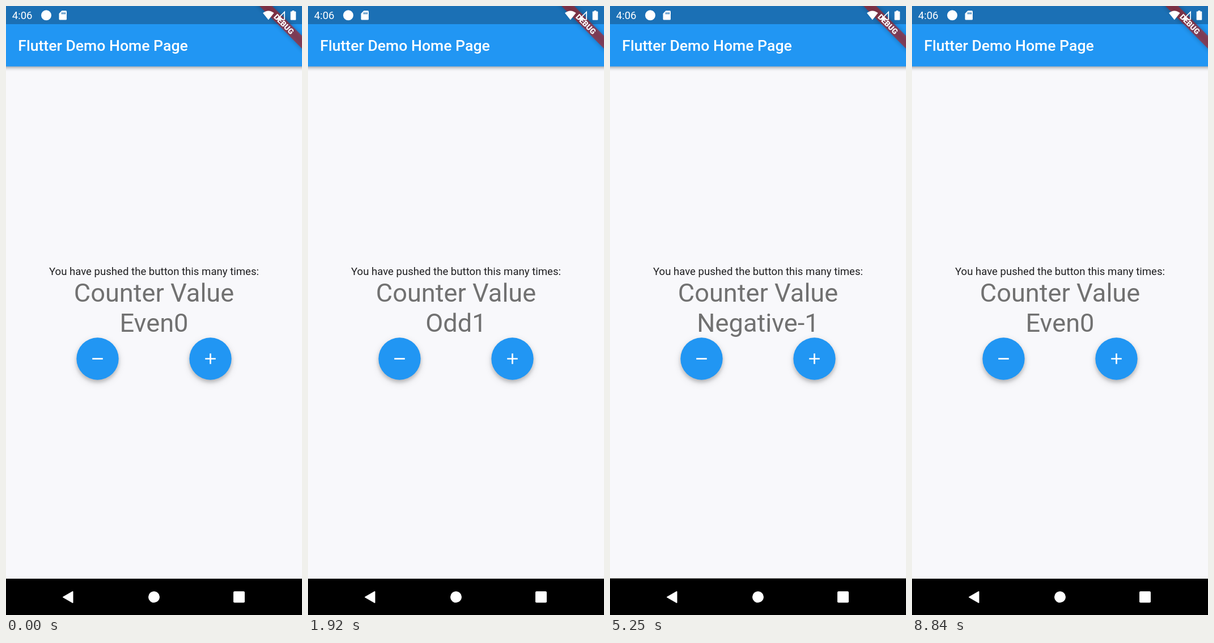
These frames come from a looping animation (522 by 1073 pixels, 8890 ms). An HTML page:

```html
<!DOCTYPE html>
<html lang="en">
<head>
<meta charset="utf-8">
<title>Counter</title>
<style>
  html, body { margin: 0; width: 100%; height: 100%; overflow: hidden; background: #f8f8fb; }
  svg { display: block; width: 100%; height: 100%; font-family: Roboto, "Noto Sans", sans-serif; }
  .bar { filter: drop-shadow(0 2px 3px rgba(0,0,0,.38)); }
  .fab { filter: drop-shadow(0 4px 3px rgba(0,0,0,.17)) drop-shadow(0 4px 6px rgba(0,0,0,.15)); }
  .ribbon { filter: drop-shadow(0 0 4px rgba(0,0,0,.45)); }
  .mid { text-anchor: middle; }
  .big { font-size: 45.2px; fill: #717171; }
  .small { font-size: 18.6px; }
  .white { fill: #fff; }
</style>
</head>
<body>
<svg viewBox="0 0 522 1073" preserveAspectRatio="none">
  <defs>
    <clipPath id="minusClip"><circle cx="161.5" cy="621.5" r="37.2"/></clipPath>
    <clipPath id="plusClip"><circle cx="360.5" cy="621.5" r="37.2"/></clipPath>
  </defs>
  <rect width="522" height="1073" fill="#f8f8fb"/>

  <text class="mid small" x="261" y="474" fill="#1f1f21">You have pushed the button this many times:</text>
  <text class="mid big" x="261" y="521">Counter Value</text>
  <text class="mid big" x="261" y="574" id="value">Even0</text>

  <g id="minus">
    <circle class="fab" cx="161.5" cy="621.5" r="37.2" fill="#2196f3"/>
    <g clip-path="url(#minusClip)">
      <circle class="glow" cx="161.5" cy="621.5" r="37.2" fill="#bcbcbc" opacity="0"/>
      <circle class="splash" r="0" fill="#c8c8c8" opacity="0"/>
    </g>
    <path d="M152.2 621.5h18.6" stroke="#fff" stroke-width="2.7"/>
  </g>
  <g id="plus">
    <circle class="fab" cx="360.5" cy="621.5" r="37.2" fill="#2196f3"/>
    <g clip-path="url(#plusClip)">
      <circle class="glow" cx="360.5" cy="621.5" r="37.2" fill="#bcbcbc" opacity="0"/>
      <circle class="splash" r="0" fill="#c8c8c8" opacity="0"/>
    </g>
    <path d="M351.2 621.5h18.6M360.5 612.2v18.6" stroke="#fff" stroke-width="2.7"/>
  </g>

  <g id="snack" visibility="hidden">
    <rect y="0" width="522" height="62" fill="#323230"/>
    <text class="small white" id="note" x="31.9" y="35.5"></text>
  </g>

  <rect class="bar" x="-10" y="-10" width="542" height="116.5" fill="#2196f3"/>
  <rect width="522" height="32" fill="#1b70b5"/>
  <text class="white" x="21.3" y="79.3" font-size="26.6" font-weight="500">Flutter Demo Home Page</text>

  <g transform="translate(522 0) rotate(45)">
    <rect class="ribbon" x="-60" y="37.2" width="120" height="15.9" fill="#b71c1c" fill-opacity=".627"/>
    <text class="mid white" x="0" y="50" font-size="13.6" font-weight="900">DEBUG</text>
  </g>

  <g class="white">
    <text class="small" x="10.7" y="23">4:06</text>
    <circle cx="71" cy="16.3" r="9"/>
    <path fill-rule="evenodd" d="M98.5 8.3H105.5Q107 8.3 107 9.8V23Q107 24.5 105.5 24.5H95Q93.5 24.5 93.5 23V13.3ZM98 11.2V14.4H99.6V11.2ZM100.7 11.2V14.4H102.3V11.2ZM103.3 11.2V14.4H104.9V11.2Z"/>
    <path d="M453 12.3Q462.7 4.6 472.6 12.3L462.8 24.5Z"/>
    <path d="M476 24.6L492 8.4V24.6ZM484.5 18.5V23H490.3V12.6Z" fill-rule="evenodd"/>
    <path d="M504.7 8H508.3V9.6H510.3Q511.3 9.6 511.3 10.6V23.8Q511.3 24.8 510.3 24.8H502.7Q501.7 24.8 501.7 23.8V10.6Q501.7 9.6 502.7 9.6H504.7Z"/>
  </g>

  <rect y="1009" width="522" height="64"/>
  <g class="white">
    <path d="M101 1041.5L117.5 1032V1051Z" stroke="#fff" stroke-width="2" stroke-linejoin="round"/>
    <circle cx="261" cy="1041.3" r="10"/>
    <rect x="401" y="1031.3" width="20" height="20" rx="2"/>
  </g>
</svg>
<script>
const LOOP = 8890, HOLD = 1250, SLIDE = 250, SNACK = 58, FLOOR = 1009, REACH = 66;
const taps = [
  { down: 460,  up: 560,  step: 1,  x: 364, y: 624 },
  { down: 3850, up: 3950, step: -1, x: 170, y: 618 },
  { down: 4500, up: 4600, step: -1, x: 178, y: 615 },
  { down: 7030, up: 7130, step: 1,  x: 364, y: 624 }
];
// Notices queue up: each waits until the one before has gone.
let free = 0;
const notices = taps.map(({ up, step }) => {
  const start = Math.max(up + 35, free);
  free = start + HOLD;
  return { start, end: free, text: step > 0 ? "Incremented" : "Decremented" };
});

const $ = id => document.getElementById(id);
const clamp = v => Math.min(1, Math.max(0, v));
const value = $("value"), snack = $("snack"), note = $("note");
const buttons = ["minus", "plus"].map(id => ({
  step: id === "plus" ? 1 : -1,
  glow: $(id).querySelector(".glow"),
  splash: $(id).querySelector(".splash")
}));

// cubic-bezier(.4, 0, .2, 1)
function ease(x) {
  let lo = 0, hi = 1;
  for (let i = 0; i < 20; i++) {
    const s = (lo + hi) / 2, r = 1 - s;
    if (1.2 * r * r * s + 0.6 * r * s * s + s * s * s < x) lo = s; else hi = s;
  }
  return lo * lo * (3 - 2 * lo);
}

function drawButton({ step, glow, splash }, t) {
  const tap = taps.find(p => p.step === step && t >= p.down && t < p.up + 200);
  if (!tap) {
    glow.setAttribute("opacity", 0);
    splash.setAttribute("opacity", 0);
    return;
  }
  const fade = 1 - clamp((t - tap.up) / 200);
  const slow = Math.min(t, tap.up) - tap.down;
  const grown = slow / 1000 + (1 - slow / 1000) * clamp((t - tap.up) / 60);
  glow.setAttribute("opacity", 0.4 * clamp((t - tap.down) / 200 + clamp((t - tap.up) / 60)) * fade);
  splash.setAttribute("opacity", 0.4 * fade);
  splash.setAttribute("cx", tap.x);
  splash.setAttribute("cy", tap.y);
  splash.setAttribute("r", REACH * grown);
}

function drawSnack(t) {
  const n = notices.find(n => t >= n.start && t < n.end);
  snack.setAttribute("visibility", n ? "visible" : "hidden");
  if (!n) return;
  const v = clamp(Math.min(t - n.start, n.end - t) / SLIDE);
  snack.setAttribute("transform", `translate(0 ${FLOOR - SNACK * ease(v)})`);
  note.textContent = n.text;
  note.setAttribute("opacity", clamp((v - 0.72) / 0.28));
}

function draw(t) {
  const count = taps.reduce((sum, p) => sum + (t >= p.up ? p.step : 0), 0);
  value.textContent = (count < 0 ? "Negative" : count % 2 ? "Odd" : "Even") + count;
  buttons.forEach(b => drawButton(b, t));
  drawSnack(t);
}

const begin = performance.now();
function tick() {
  draw((performance.now() - begin) % LOOP);
  requestAnimationFrame(tick);
}
tick();
</script>
</body>
</html>
```
